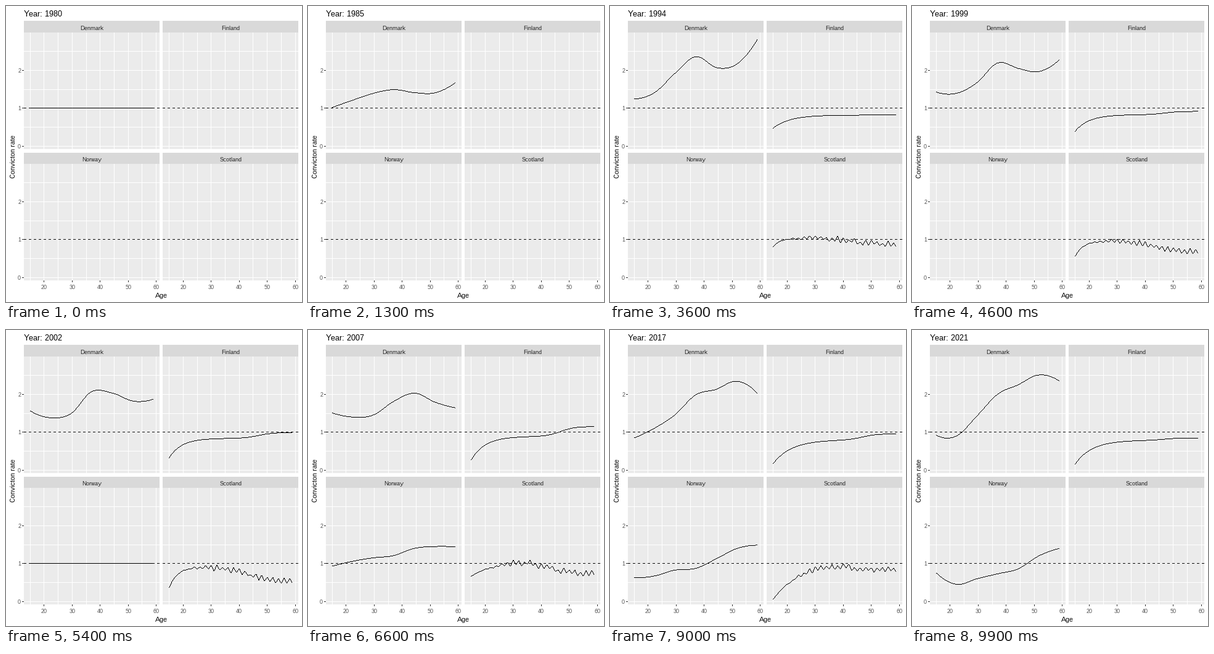
Recreate the animation shown at these times as a matplotlib script. Size 480 px wide and 480 px high, loop 10000 ms.

```python
import matplotlib.pyplot as plt
import numpy as np
from matplotlib.animation import FuncAnimation
from matplotlib.patches import Rectangle

plt.rcParams.update({"font.family": "Liberation Sans",
                     "text.hinting": "native", "text.hinting_factor": 1})

SIZE, DPI = 480, 80
FRAMES, FIRST, LAST = 100, 1980, 2021
SCOTLAND_END = 93  # first frame without the Scottish series

AGES = np.arange(15, 60)
UNIT = 61.5              # pixels per unit of rate
AGE_STEP = 220 / 48.4    # pixels per year of age


def flat():
    return np.ones(len(AGES))


def smooth(*keys):
    """Cubic Hermite curve through evenly spaced key points."""
    v = np.array(keys)
    slope = np.gradient(v, edge_order=2)
    u = np.linspace(0, len(v) - 1, len(AGES))
    j = np.minimum(u.astype(int), len(v) - 2)
    t = u - j
    ease = t * t * (3 - 2 * t)
    return (v[j] * (1 - ease) + v[j + 1] * ease
            + t * (1 - t) * (slope[j] * (1 - t) - slope[j + 1] * t))


def rise(start, level, tau, shift, turn=47, width=2.5):
    """Saturating growth from start to level, then a soft step by shift."""
    growth = level - (level - start) * np.exp(-(AGES - 15) / tau)
    return growth + shift / (1 + np.exp((turn - AGES) / width))


def jagged(seed, *shape):
    """A rise with a zigzag that grows with age."""
    amp = np.random.default_rng(seed).uniform(0.01, 0.1, len(AGES))
    sign = np.where(AGES % 2, -1, 1)
    return rise(*shape, turn=42, width=4) + sign * amp * np.clip((AGES - 18) / 12, 0, 1)


series = {
    "Denmark": {
        1980: flat(),
        1990: smooth(1.03, 1.42, 1.78, 1.98, 1.82, 1.81, 2.34),
        1995: smooth(1.25, 1.41, 1.92, 2.36, 2.07, 2.16, 2.81),
        2002: smooth(1.56, 1.38, 1.49, 2.07, 2.03, 1.82, 1.87),
        2007: smooth(1.51, 1.40, 1.45, 1.81, 2.03, 1.79, 1.64),
        2014: smooth(0.79, 1.26, 1.48, 1.97, 2.04, 2.22, 1.77),
        2021: smooth(0.92, 0.90, 1.43, 2.00, 2.25, 2.51, 2.34),
    },
    "Finland": {
        1990: flat(),
        1995: rise(0.47, 0.82, 6, 0),
        2002: rise(0.32, 0.84, 4.5, 0.15),
        2007: rise(0.26, 0.89, 5, 0.26),
        2014: rise(0.17, 0.81, 7, 0.23),
        2021: rise(0.15, 0.79, 6, 0.06),
    },
    "Norway": {
        2002: flat(),
        2007: smooth(0.93, 1.06, 1.15, 1.21, 1.40, 1.45, 1.44),
        2014: smooth(0.53, 0.84, 1.00, 0.98, 1.32, 1.54, 1.55),
        2021: smooth(0.75, 0.45, 0.60, 0.73, 0.86, 1.20, 1.40),
    },
    "Scotland": {
        1990: flat(),
        1995: jagged(1, 0.80, 1.04, 2.5, -0.17),
        2002: jagged(2, 0.36, 0.91, 3, -0.37),
        2007: jagged(3, 0.66, 1.09, 9, -0.36),
        2014: jagged(4, 0.09, 1.15, 11, -0.28),
        2018: jagged(5, 0.04, 1.12, 11, -0.28),
    },
}


def rate(country, year):
    """Curve of a year, blended between key years; None outside the data."""
    known = series[country]
    years = list(known)
    if year < years[0]:
        return None
    k = np.interp(year, years, range(len(years)))
    a, f = int(k), k % 1
    b = min(a + 1, len(years) - 1)
    return known[years[a]] * (1 - f) + known[years[b]] * f


fig = plt.figure(figsize=(SIZE / DPI, SIZE / DPI), dpi=DPI, facecolor="white")
ax = fig.add_axes([0, 0, 1, 1])
ax.set(xlim=(0, SIZE), ylim=(SIZE, 0))
ax.axis("off")


def box(x, y, w, h, color):
    """Filled rectangle on whole pixels."""
    ax.add_patch(Rectangle((int(x), int(y)), w, h, fc=color, lw=0, antialiased=False))


def label(x, y, text, size, color="black", **kw):
    return ax.text(x, y, text, fontsize=size * 72 / DPI, color=color,
                   **{"ha": "center", "va": "baseline", **kw})


def x_pos(left, age):
    return left + 10 + (age - 15) * AGE_STEP


def y_pos(top, value):
    return top + 184.3 - UNIT * value


def panel(name, left, top, strip):
    box(left, strip, 220, top - strip, "#D9D9D9")
    box(left, top, 220, 189, "#EBEBEB")
    label(left + 110, top - 4, name, 9, "#1A1A1A")
    for v in np.arange(0, 3, 0.5):
        box(left, y_pos(top, v), 220, 1, "white")
    for age in range(15, 61, 5):
        box(x_pos(left, age), top, 1, 189, "white")
    for dash in range(0, 220, 8):
        box(left + dash, y_pos(top, 1), 4, 1, "black")
    if left < 100:
        for v in range(3):
            y = int(y_pos(top, v))
            box(left - 3, y, 3, 1, "#333333")
            label(left - 5, y + 4, str(v), 9, "#4D4D4D", ha="right")
    if top > 100:
        for age in range(20, 61, 10):
            x = x_pos(left, age)
            box(x, top + 189, 1, 3, "#333333")
            label(x, top + 203, str(age), 9, "#4D4D4D")
    edges = int(left) + 10 + np.arange(201)
    return ax.stairs(np.ones(200), edges, baseline=np.zeros(200), fill=True,
                     color="black", lw=0, antialiased=False)


def trace(curve, left, top, values):
    """Draw a hard one-pixel line: one run of pixels per column."""
    edges = int(left) + 10 + np.arange(201)
    y = np.interp(edges, x_pos(left, AGES), y_pos(top, values))
    upper = np.floor(np.minimum(y[:-1], y[1:]))
    lower = np.maximum(upper + 1, np.floor(np.maximum(y[:-1], y[1:])))
    curve.set_data(upper, edges, lower)


places = {"Denmark": (29.15, 43, 24), "Finland": (254.6, 43, 24),
          "Norway": (29.15, 256, 238), "Scotland": (254.6, 256, 238)}
curves = {name: panel(name, *place) for name, place in places.items()}
ax.set(xlim=(0, SIZE), ylim=(SIZE, 0))

title = label(29, 17, "", 13, ha="left")
label(251.8, 473, "Age", 11)
label(12.5, 244, "Convicton rate", 11, rotation=90, va="center")


def update(i):
    span = LAST - FIRST
    title.set_text(f"Year: {FIRST + i * span // (FRAMES - 1)}")
    # curves switch at the nearest frame, the title only once a year is complete
    year = FIRST + int((i + 0.5) * span / (FRAMES - 1))
    for name, curve in curves.items():
        left, top, _ = places[name]
        values = rate(name, year)
        shown = values is not None and not (name == "Scotland" and i >= SCOTLAND_END)
        curve.set_visible(shown)
        if shown:
            trace(curve, left, top, values)
    return [title, *curves.values()]


anim = FuncAnimation(fig, update, frames=FRAMES, interval=100, repeat=True,
                     repeat_delay=0, blit=False)
plt.show()
```
